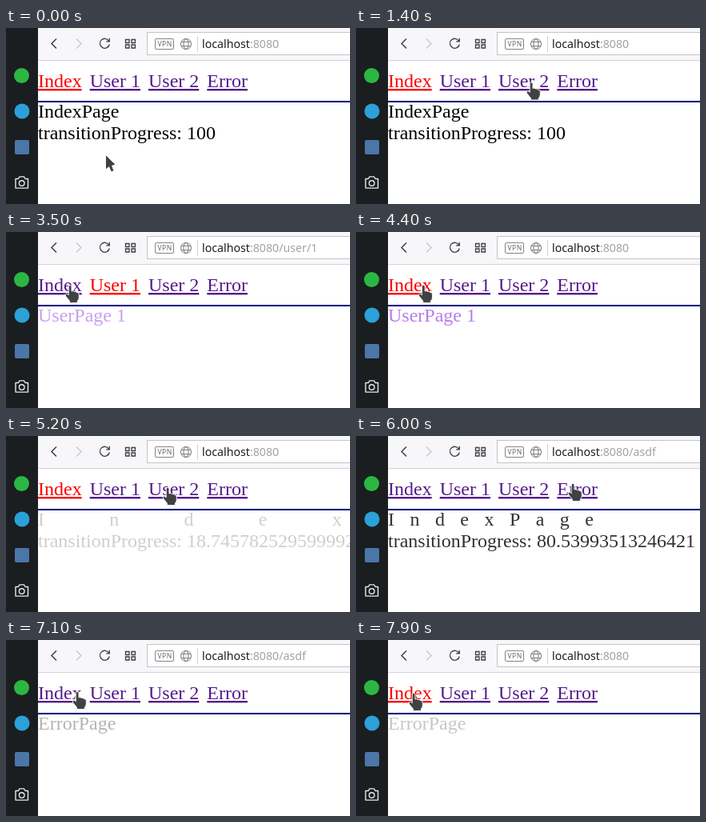
Recreate the animation shown at these times as an HTML page. Size 430 px wide and 220 px high, loop 8000 ms.

```html
<!DOCTYPE html>
<html lang="en">
<head>
<meta charset="utf-8">
<title>Page transitions</title>
<style>
  html, body { margin: 0; width: 100%; height: 100%; overflow: hidden; background: #fff; }
  svg { display: block; }
  .page { font: 24px "Liberation Serif", serif; white-space: pre; }
  .link { fill: #551a8b; text-decoration: underline; }
  .link.active { fill: #f00; }
  .url { font: 14.2px "Noto Sans", sans-serif; fill: #a2a2a6; }
  .icon { fill: none; stroke: #3c3f46; stroke-width: 1.3; }
</style>
</head>
<body>
<svg width="430" height="220" viewBox="0 0 430 220">
  <!-- browser toolbar -->
  <rect x="40" width="390" height="41" fill="#f7f7fa"/>
  <rect x="40" y="40" width="390" height="1" fill="#d4d4d9"/>
  <rect x="176.5" y="5.5" width="270" height="28" fill="#fff" stroke="#c3c3ca"/>
  <g class="icon">
    <path d="M63 13.5 57 19.5 63 25.5" stroke-width="1.5"/>
    <path d="M88 13.5 94 19.5 88 25.5" stroke="#c6c6cb"/>
    <path d="M128.6 16.2A6 6 0 1 0 129.3 20.5M129.3 12.8V16.8H125.2"/>
    <path d="M149.5 14.5h4.5v4h-4.5zM157 14.5h4.5v4H157zM149.5 21h4.5v4h-4.5zM157 21h4.5v4H157z"/>
    <rect x="186.5" y="13.5" width="23" height="13" rx="1.5" stroke="#85858a" stroke-width="1"/>
    <g stroke="#77777c" stroke-width="1">
      <circle cx="225" cy="20" r="6.5"/>
      <ellipse cx="225" cy="20" rx="3" ry="6.5"/>
      <path d="M219.2 17.3h11.6M219.2 22.7h11.6"/>
    </g>
    <path d="M239.5 10V30" stroke="#d0d0d4" stroke-width="1"/>
  </g>
  <text x="189.5" y="23.2" font-family="Noto Sans, sans-serif" font-size="8.5" fill="#66666b" letter-spacing=".5">VPN</text>
  <text class="url" x="245" y="25"><tspan fill="#1c1c1e">localhost</tspan>:8080<tspan id="path"></tspan></text>

  <!-- page -->
  <g id="links" class="page"></g>
  <rect x="40" y="91" width="390" height="2" fill="#00007f"/>
  <g id="index" class="page">
    <text id="title" x="40" y="112">IndexPage</text>
    <text id="counter" x="40" y="139"></text>
  </g>
  <text id="user" class="page" x="40" y="112" fill="blueviolet">UserPage 1</text>
  <text id="error" class="page" x="40" y="112">ErrorPage</text>

  <!-- sidebar -->
  <rect width="40" height="220" fill="#1a1e20"/>
  <circle cx="19.5" cy="59.5" r="9.5" fill="#2cb742"/>
  <circle cx="20" cy="104" r="9.5" fill="#2ca0d8"/>
  <rect x="11" y="140" width="18" height="18" rx="2" fill="#4a76a8"/>
  <g fill="none" stroke="#e8e8e8" stroke-width="1.4">
    <path d="M12 188.5h3.4l1.6-2.6h5.5l1.6 2.6h3.4v11.6H12z" stroke-linejoin="round"/>
    <circle cx="19.7" cy="194" r="3.3"/>
  </g>

  <!-- pointers, hotspot at the origin -->
  <g id="pointer" fill="#3f4142" stroke="#f4f4f4" stroke-linejoin="round">
    <path id="arrow" d="M0 0V18.5L4.2 15.2 7 21.5 10.5 20 8 13.8 12.5 12.3Z"/>
    <path id="hand" d="M-1.8 1Q-1.8 -.6 0 -.6T2 1V7Q4 5.8 5.2 7.5 7.3 6.6 8.3 8.5 11.3 8 11.3 11V15Q11 18 9.3 19V21.5H-.5V19.3L-5.3 13.2Q-6.8 10.8 -4.8 10.2 -3.3 10 -1.8 11.8Z"/>
  </g>
</svg>
<script>
const LOOP = 8000, STEP = 100;
const RATE = 0.0998918593833333; // percent per millisecond
const $ = id => document.getElementById(id);

const links = [
  { label: "Index", x: 40, width: 54.7, path: "" },
  { label: "User 1", x: 104.7, width: 63.3, path: "/user/1" },
  { label: "User 2", x: 178, width: 63.3, path: "/user/2" },
  { label: "Error", x: 251.3, width: 50.7 }
];
for (const link of links) {
  link.node = document.createElementNS("http://www.w3.org/2000/svg", "text");
  link.node.textContent = link.label;
  link.node.setAttribute("x", link.x);
  link.node.setAttribute("y", 74);
  $("links").append(link.node);
}

const visits = [[0, ""], [2050, "/user/1"], [4028, ""], [5909, "/asdf"], [7460, ""]];

// pointer stops: time, x, y
const stops = [
  [600, 124.5, 158.5], [900, 112, 88], [1100, 165, 70], [1300, 262, 65],
  [1500, 176, 72], [1700, 140, 74], [1900, 126, 63], [2500, 126, 63],
  [3400, 80, 67], [4300, 80, 67], [5200, 202, 65], [5800, 271, 60],
  [6300, 271, 60], [7100, 89, 65], [7500, 72, 67]
];

const clamp = (v, lo, hi) => Math.min(hi, Math.max(lo, v));
const rise = (t, at, value = 0) => value + (t - at) * RATE;
const fall = (t, at, value = 0) => value - (t - at) * RATE;
const pulse = (up, down) => clamp(Math.min(up, down), 0, 100);

function indexProgress(t) {
  return t < 4000
    ? pulse(100, fall(t, 2400, 64.2597474607605))
    : pulse(rise(t, 5200, 18.745782529599992), fall(t, 6000, 80.53993513246421));
}

function pointerAt(t) {
  const next = stops.findIndex(s => s[0] > t);
  if (next === 0) return stops[0].slice(1);
  if (next < 0) return stops.at(-1).slice(1);
  const [t0, x0, y0] = stops[next - 1], [t1, x1, y1] = stops[next];
  const k = (t - t0) / (t1 - t0), e = k * k * (3 - 2 * k);
  return [x0 + (x1 - x0) * e, y0 + (y1 - y0) * e];
}

function draw(t) {
  const path = visits.findLast(v => v[0] <= t)[1];
  $("path").textContent = path;
  for (const link of links)
    link.node.setAttribute("class", link.path === path ? "link active" : "link");

  const progress = indexProgress(t);
  $("index").setAttribute("opacity", progress / 100);
  $("title").style.letterSpacing = `${100 - progress}px`;
  $("counter").textContent = `transitionProgress: ${progress}`;
  $("user").setAttribute("opacity", pulse(rise(t, 3043), fall(t, 5013)) / 100);
  $("error").setAttribute("opacity", pulse(rise(t, 6806), fall(t, 7900, 22)) / 100);

  const [x, y] = pointerAt(t);
  const over = y > 53 && y < 81 && links.some(l => x >= l.x && x <= l.x + l.width);
  $("pointer").setAttribute("transform", `translate(${x} ${y})`);
  $("hand").style.display = over ? "" : "none";
  $("arrow").style.display = over ? "none" : "";
}

const start = performance.now();
function frame() {
  const t = (performance.now() - start) % LOOP;
  draw(Math.floor(t / STEP) * STEP);
  requestAnimationFrame(frame);
}
frame();
</script>
</body>
</html>
```
